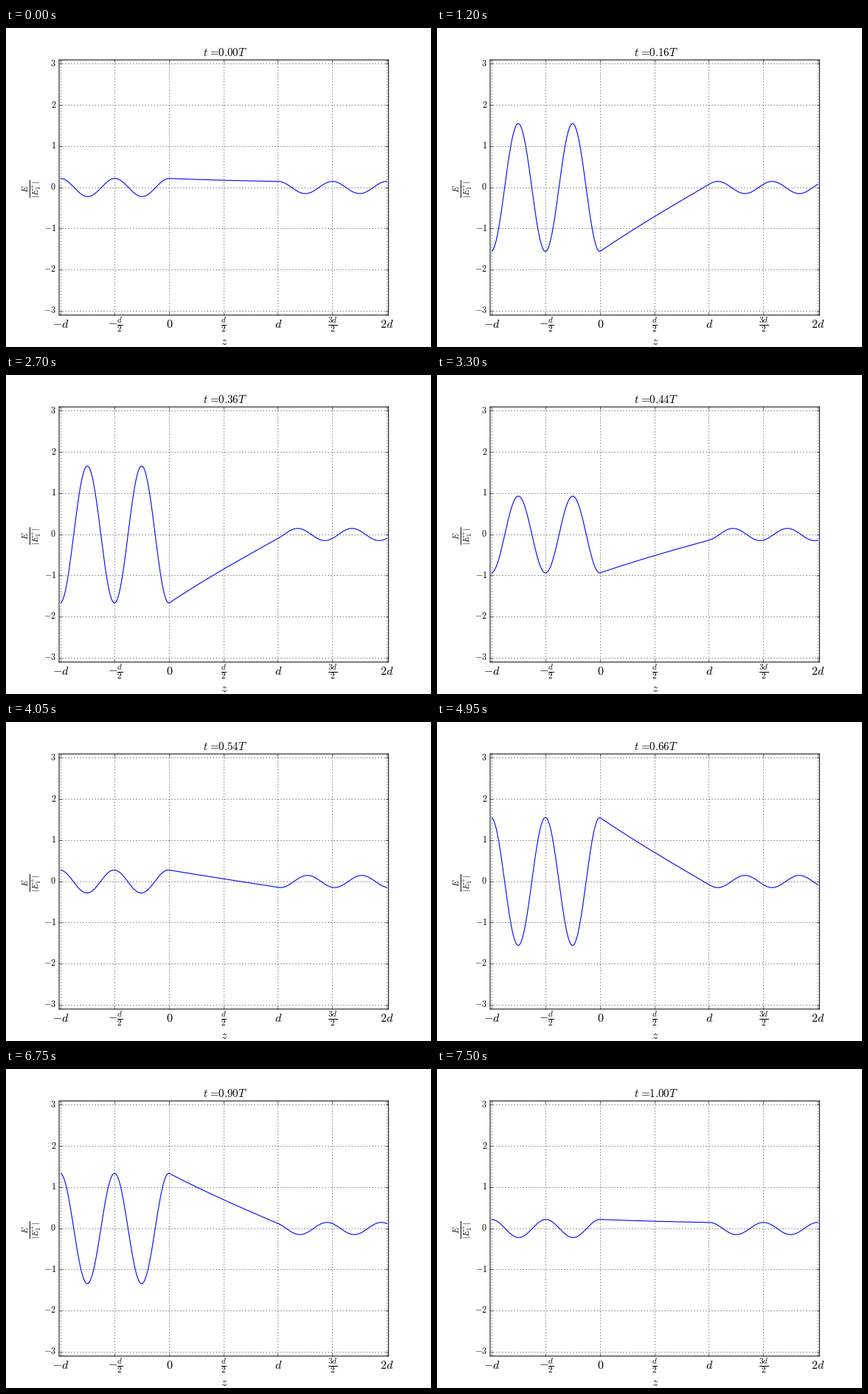
These frames come from a looping animation (576 by 432 pixels, 7650 ms). A matplotlib script:

```python
import numpy as np
import matplotlib.pyplot as plt
from matplotlib.animation import FuncAnimation

WIDTH, HEIGHT, DPI = 576, 432, 72
FRAMES, INTERVAL = 51, 150
LEFT, AXES_W, AXES_H = 72, 446.4, 345.6
X_MIN, X_MAX, Y_MAX = -1.016, 2.016, 3.1

plt.style.use("classic")
plt.rcParams.update({
    "mathtext.fontset": "cm",
    "savefig.dpi": "figure",
    "savefig.facecolor": "auto",
    "grid.linewidth": 0.75,
})

# Complex field amplitudes; lengths are in units of the slab thickness d.
K = 4 * np.pi                  # wave number outside the slab
FRONT = 0.22 - 1.97j           # field at z = 0
BACK = 0.148                   # field at z = d
NET = 0.174 + 0.008j           # incident minus reflected amplitude
Q = np.sqrt(0.35)              # decay constant inside the slab


def field(z):
    before = FRONT * np.cos(K * z) + 1j * NET * np.sin(K * z)
    inside = (FRONT * np.sinh(Q * (1 - z)) + BACK * np.sinh(Q * z)) / np.sinh(Q)
    after = BACK * np.exp(1j * K * (z - 1))
    return np.where(z < 0, before, np.where(z <= 1, inside, after))


fig = plt.figure(figsize=(WIDTH / DPI, HEIGHT / DPI), dpi=DPI, facecolor="white")
ax = fig.add_axes([0.125, 0.1, 0.775, 0.8])
ax.set_xlim(X_MIN, X_MAX)
ax.set_ylim(-Y_MAX, Y_MAX)
ax.grid(True)
for spine in ax.spines.values():
    spine.set_snap(False)


def label(x, y, text, **style):
    """Place math text at stage pixels, y measured from the top."""
    options = dict(fontsize=16, ha="center", va="baseline") | style
    return fig.text(x / WIDTH, 1 - y / HEIGHT, text, **options)


# Move ticks almost half a pixel left and up so that snapping rounds down.
px_x = (X_MAX - X_MIN) / AXES_W
px_y = 2 * Y_MAX / AXES_H

x_ticks = np.linspace(-1, 2, 7)
x_names = ["-d", r"-\frac{d}{2}", "0", r"\frac{d}{2}", "d", r"\frac{3d}{2}", "2d"]
ax.set_xticks(x_ticks - 0.49 * px_x, [""] * len(x_ticks))
for tick, name in zip(x_ticks, x_names):
    label(LEFT + (tick - X_MIN) / px_x, 405.5, f"${name}$")

y_ticks = np.arange(-3, 4)
ax.set_yticks(y_ticks + 0.49 * px_y, [f"${v}$" for v in y_ticks], fontsize=12)

label(296, 429, "$z$")
label(35, 217.5, r"$\frac{E}{|E_1^{+}|}$", rotation=90, va="center")
title = label(296.6, 38.2, "", fontsize=15)

z = np.linspace(-1, 2, 601)
amplitude = field(z)
wave, = ax.plot(z, amplitude.real, color="blue", linewidth=1.1)


def update(frame):
    t = frame / (FRAMES - 1)
    wave.set_ydata((amplitude * np.exp(-2j * np.pi * t)).real)
    title.set_text(rf"$t\hspace{{0.08}}=\hspace{{-0.2}}\mathbf{{{t:.2f}}}T$")
    return wave, title


anim = FuncAnimation(fig, update, frames=FRAMES, interval=INTERVAL,
                     repeat=True, repeat_delay=0, blit=False)
plt.show()
```
